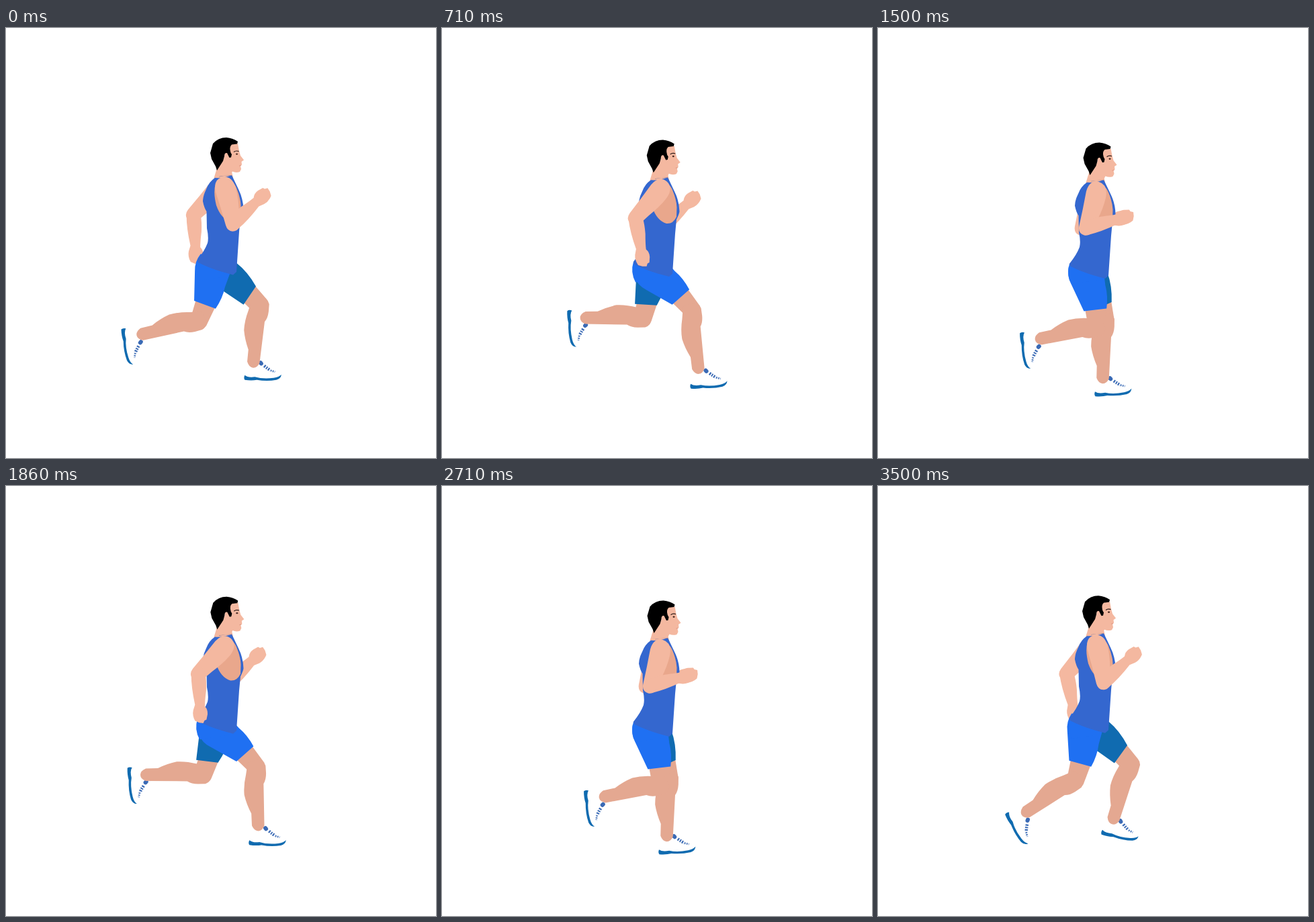
Animation of 640x640 px, one loop 3.57 s. Source, as an HTML page:

```html
<!DOCTYPE html>
<html lang="en">
<head>
<meta charset="utf-8">
<title>Runner</title>
<style>
  html, body { margin: 0; width: 100%; height: 100%; overflow: hidden; background: #fff; }
  svg { display: block; width: 100%; height: 100%; }
  .leg { fill: #e4a891; }
  .skin { fill: #f4b8a0; }
  .sole { fill: #106bb0; }
  .shoe { fill: #fff; }
  .shirt { fill: #3467cf; }
  .near { fill: #1f70f2; }
  .far { fill: #106bb0; }
  .lace { fill: none; stroke: #3a6ab5; }
</style>
</head>
<body>
<svg viewBox="0 0 640 640">
  <defs>
    <g id="shoe">
      <path class="shoe" d="M-10 -4Q-15 8 -14 20Q0 23 16 23Q34 23 41 17Q38 14 30 12L14 -3Z"/>
      <path class="sole" d="M-13 18Q-15 22 -13 25Q-3 26.5 5 25Q20 27.5 34 25Q41 23 41.5 17Q38 21 30 22Q14 24 2 20.5Q-8 22 -13 18Z"/>
      <path class="lace" stroke-width="6" stroke-linecap="round" d="M10.5 -.5L11.5 .7"/>
      <path class="lace" stroke-width="4.5" stroke-dasharray="2 1.6" d="M16 4Q22 9 25 10.5"/>
      <path class="lace" stroke-width="2.8" stroke-dasharray="1.6 1.5" d="M25.5 11L32 13"/>
    </g>
    <path id="calf" class="leg" d="M-14 -8L-17 10Q-21 26 -20 40Q-17 54 -10 68L-9.5 86Q-6 94 0 94Q6 94 9 86L9 24Q13 18 13 8L12.5 -3Q9 -13 -2 -12Z"/>
    <path id="fore" class="skin" d="M-10.5 0Q-11.5 20 -7 46L-10 54Q-12 62 -8 70L-2 73L4 74L6 70L9 69L11 61Q12 54 7.5 49Q8 40 10.5 26Q12 12 10.5 0Q8 -10.5 0 -10.5Q-8 -10.5 -10.5 0Z"/>
    <path id="upper" class="skin" d="M-14.5 4Q-14 -14 0 -14.5Q14 -14 16 4Q17 20 13 40L11 57Q8 68 0 68Q-10 68 -11 57L-12.5 30Z"/>
  </defs>

  <g id="farArm">
    <use href="#upper"/>
    <g><use href="#fore"/></g>
  </g>

  <g id="farLeg">
    <path class="leg" d="M-16 55L-15 79Q-9 92 0 93Q12 92 12.5 82L14 50Z"/>
    <g>
      <use href="#shoe" transform="translate(0 87) rotate(-7)"/>
      <use href="#calf"/>
    </g>
    <path class="far" d="M-20 -5L-26 30L-18 65L14 58Q20 34 17 14L15 -10Z"/>
  </g>

  <g id="nearLeg">
    <path class="leg" d="M-14 54L-13 78Q-10 94 0 98Q10 98 13 88L17 56Z"/>
    <g>
      <use href="#shoe" transform="translate(0 90) rotate(2)"/>
      <use href="#calf"/>
    </g>
    <path class="near" d="M-29 -10Q-34 4 -29 17L-16 59L18 60Q23 42 21 25L22 -10Z"/>
  </g>

  <g id="body">
    <path class="near" d="M285 345Q280 361 288 376L329 370L335 358Z"/>
    <path class="skin" d="M315 205L309 225Q322 230 338 223L336 214Z"/>
    <path class="shirt" d="M311 223Q302 229 298 240Q293 250 293 258Q295 268 298.5 273L299 298Q302 312 300 320Q296 331 285 345L286 349Q304 358 322 363L338 367.5L343 363L347 303L349 282Q353 274 353.5 270Q353 254 346 240L336 219Q324 224 311 223Z"/>
    <path fill="#e9a78c" d="M322 224Q337 224 343 238Q349 252 349.5 264L349 278Q344 289 334 288Q320 284 313 264Q308 244 312 232Z"/>
    <path fill="none" stroke="#8c7f98" stroke-width=".8" d="M317 221Q326 218 336 219.5"/>
    <g id="head">
      <path class="skin" d="M326 174L345 172L347 183L349 190L354 196.5L350.5 199L351 203.5L349 205.5L350 210L348 214Q342 216 337 213.5L334 219L312 221L316 208L325 192Z"/>
      <path d="M314 212L312 206L306 195L304 186L308 172Q316 163 328 163Q338 164 345 169L344 172.5L336 173.5Q333 176 333.5 181Q334 186 336 188L335 192.5L332.5 193L329 186Q325 185 325 191L323 198Z"/>
      <path fill="none" stroke="#2a1a18" stroke-width="1.2" d="M339 184.5Q342 182 346.5 183.5"/>
      <ellipse cx="343.5" cy="187.5" rx="1.5" ry="1.2" fill="#4a2a22"/>
      <path fill="none" stroke="#d98f7c" stroke-width=".8" d="M347 205L350 204.5"/>
    </g>
  </g>

  <g id="nearArm">
    <use href="#upper"/>
    <g><use href="#fore"/></g>
  </g>
</svg>

<script>
const LOOP = 3570, STEPS = 50, POSES = 25;
const $ = id => document.getElementById(id);
const wave = (p, peak = 0) => Math.cos(2 * Math.PI * (p - peak) / POSES);

// Key points of one shin swing: [pose, angle].
const shinKeys = [[0, -7], [3.5, 8], [7, -3], [9, -11], [12.2, -79], [15, -91], [19, -80], [21, -60]];

// Smooth cyclic curve through the key points.
function curve(keys, p) {
  const n = keys.length;
  const key = i => {
    const turn = Math.floor(i / n), [t, v] = keys[i - turn * n];
    return [t + turn * POSES, v];
  };
  p = (p + POSES) % POSES;
  let i = n - 1;
  while (keys[i][0] > p) i--;
  const [a, b, c, d] = [i - 1, i, i + 1, i + 2].map(key);
  const span = c[0] - b[0], u = (p - b[0]) / span, v = 1 - u;
  const m0 = (c[1] - a[1]) / (c[0] - a[0]) * span;
  const m1 = (d[1] - b[1]) / (d[0] - b[0]) * span;
  return v * v * ((1 + 2 * u) * b[1] + u * m0) + u * u * ((1 + 2 * v) * c[1] - v * m1);
}

// Angles from straight down, positive towards the front.
const thigh = p => 13 + 32.5 * wave(p, .4) - 2 * wave(2 * p);
const shin = p => curve(shinKeys, p);
const upperArm = p => -15 + 28.5 * wave(p, .7);
const forearm = p => 133 - 131 * ((1 + wave(p, 13.2)) / 2) ** 2;

// Opposite limbs share one swing, about half a cycle apart.
const limbs = [
  { id: 'nearLeg', x: 314, y: 355, len: 87, sway: .75, top: thigh, low: shin, lead: [11.3, 12.1] },
  { id: 'farLeg', x: 322, y: 352, len: 83, sway: .3, top: thigh, low: shin, lead: [0, 0] },
  { id: 'nearArm', x: 325, y: 236, len: 57, sway: .9, top: upperArm, low: forearm, lead: [0, -.4] },
  { id: 'farArm', x: 318, y: 236, len: 57, sway: .9, top: upperArm, low: forearm, lead: [12.5, 12.7] }
];

function pose(p) {
  const bob = 4.15 * (1 - wave(2 * p + .8));
  for (const l of limbs) {
    const el = $(l.id), top = l.top(p + l.lead[0]), low = l.low(p + l.lead[1]);
    el.setAttribute('transform', `translate(${l.x} ${l.y + bob * l.sway}) rotate(${-top})`);
    el.querySelector('g').setAttribute('transform', `translate(0 ${l.len}) rotate(${top - low})`);
  }
  $('body').setAttribute('transform', `translate(0 ${bob * 1.2}) scale(1 ${1 - bob * .00134})`);
  $('head').setAttribute('transform', `translate(${bob * .2} 0)`);
}

let last = -1;
const start = performance.now();
function tick(now) {
  const tens = Math.floor((Math.max(0, now - start) % LOOP) / 10);
  const step = Math.min(STEPS - 1, Math.floor((tens + .5) * 7 / 50));
  if (step !== last) {
    last = step;
    pose(Math.ceil(step * 1.5) % POSES);
  }
  requestAnimationFrame(tick);
}
tick(start);
</script>
</body>
</html>
```
